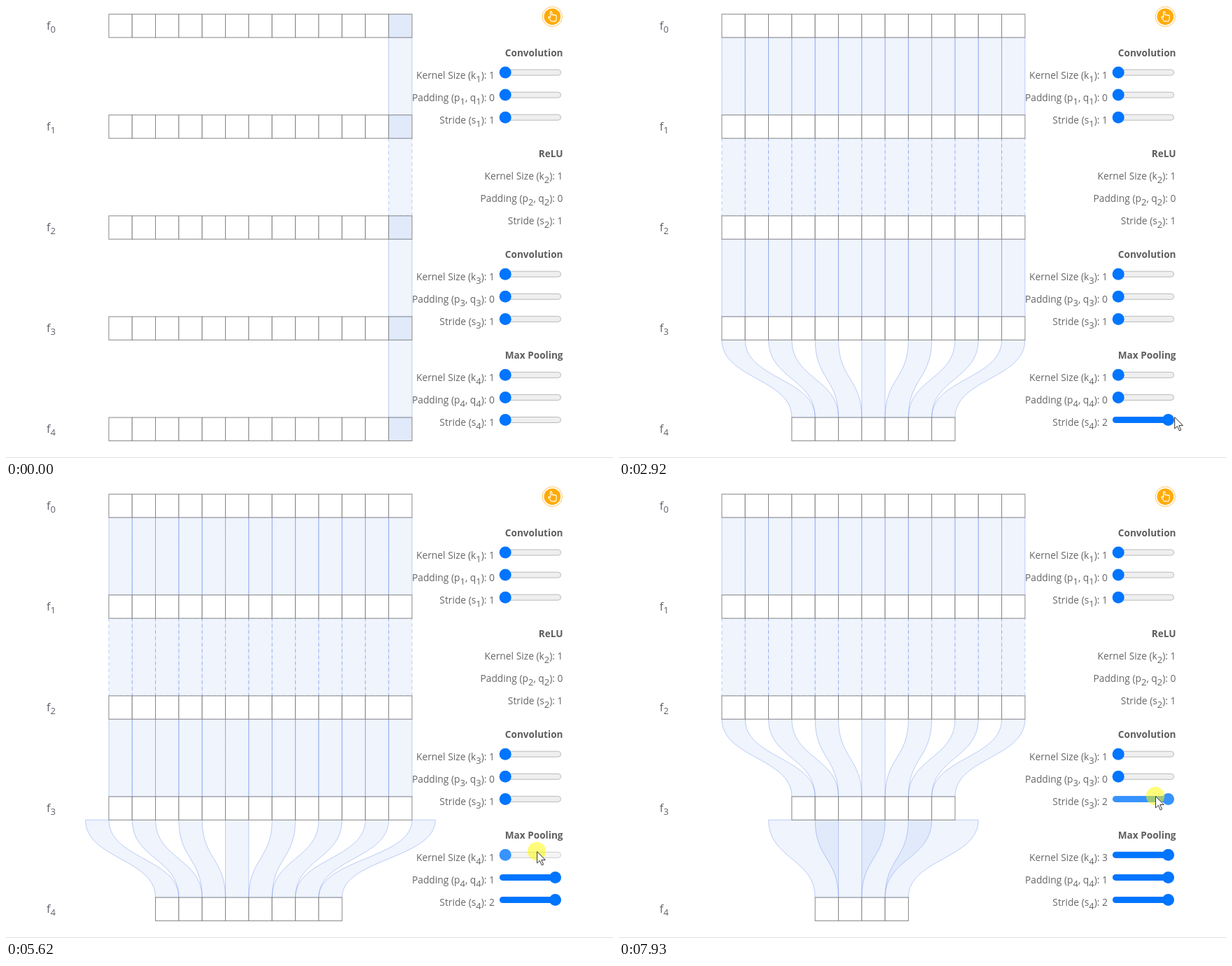
Recreate the animation shown at these times as an HTML page. Size 867 px wide and 646 px high, loop 8000 ms.

```html
<!DOCTYPE html>
<html lang="en">
<head>
<meta charset="utf-8">
<title>Receptive field explorer</title>
<style>
html, body { margin: 0; width: 867px; height: 646px; overflow: hidden; background: #fff; }
svg { display: block; }
text { font-family: "Open Sans", "Noto Sans", sans-serif; font-size: 13.8px; fill: #666; }
.title { font-weight: 700; font-size: 13.6px; fill: #5e5e5e; }
.end { text-anchor: end; }
.row { font-size: 16px; fill: #62626c; }
.cell { fill: #fff; stroke: #868686; }
.cell.lit { fill: #e0eafb; }
.band { fill: cornflowerblue; fill-opacity: .1; stroke: royalblue; stroke-opacity: .32; }
.dash { stroke-dasharray: 5 4; }
</style>
</head>
<body>
<svg id="stage" width="867" height="646" viewBox="0 0 867 646">
  <g id="bands"></g>
  <g id="cells"></g>
  <g id="labels"></g>
  <g id="sliders"></g>
  <g id="badge" transform="translate(780.3 15.2)">
    <circle r="14.2" fill="#fff" stroke="#ffc65c"/>
    <circle r="11.8" fill="#ffab09"/>
    <path d="M-2.8 1.5V-6.2q0-1.1 1.1-1.1t1.1 1.1V-2q.2-.9 1.2-.9t1.2 1q.2-.7 1.1-.7t1.1 1q.2-.5.9-.5 1 0 1 1.2V2.2Q5.900 4.500 4.600 6.700H-1.700Q-2.600 4.500-5.300 1.700-6 .6-5.200 0-4.200-.6-2.800 1.500Z"
      fill="none" stroke="#fff" stroke-width="1.1" stroke-linejoin="round"/>
  </g>
  <path d="M0 645.5H867" stroke="#dedede"/>
  <g id="pointer">
    <circle id="press" r="13.2" fill="#fffa00" fill-opacity=".52"/>
    <path d="M.5.5V17L4.300 13.400 7.200 20 9.600 18.900 6.700 12.500H12.200Z" fill="#fff" stroke="#333"/>
  </g>
</svg>
<script>
const NS = "http://www.w3.org/2000/svg";
const LOOP = 8000;
const LEFT = 146.9, TOP = 11.7, CELL = 33.31, GAP = 144.1, COLS = 13;
const $ = id => document.getElementById(id);

function add(parent, tag, attrs) {
  const node = document.createElementNS(NS, tag);
  for (const key in attrs) node.setAttribute(key, attrs[key]);
  parent.appendChild(node);
  return node;
}

// "_4" in a label becomes a subscript
function write(node, label, drop, size) {
  node.textContent = "";
  let shift = 0;
  label.split(/(_\d)/).forEach(part => {
    if (!part) return;
    const sub = part[0] === "_";
    const span = add(node, "tspan", { dy: sub ? drop : shift });
    if (sub) span.setAttribute("font-size", size);
    span.textContent = sub ? part[1] : part;
    shift = sub ? -drop : 0;
  });
}

const layers = [
  { name: "Convolution", sliders: true },
  { name: "ReLU", dashed: true },
  { name: "Convolution", sliders: true },
  { name: "Max Pooling", sliders: true }
];
const fields = [
  { key: "k", low: 1, high: 3, label: (n, v) => `Kernel Size (k_${n}): ${v}` },
  { key: "p", low: 0, high: 1, label: (n, v) => `Padding (p_${n}, q_${n}): ${v}` },
  { key: "s", low: 1, high: 2, label: (n, v) => `Stride (s_${n}): ${v}` }
];

// when each slider jumps to its high end, and when it is held
const drags = [
  { layer: 3, key: "s", from: 1460, set: 2010, to: 2630 },
  { layer: 3, key: "p", from: 3670, set: 4050, to: 4400 },
  { layer: 3, key: "k", from: 5340, set: 5680, to: 6150 },
  { layer: 2, key: "s", from: 7100, set: 7600, to: LOOP + 1 }
];

// time, x, y, eased
const track = [
  [250, 746, 656], [1000, 717, 591.5, 1], [1560, 717, 591.5], [1800, 728, 591],
  [2190, 773, 588], [2400, 788, 587], [2660, 796, 588], [2860, 796, 588],
  [3410, 714, 561, 1], [3730, 714, 561], [4400, 799, 551], [4620, 799, 551],
  [4940, 713, 527, 1], [5360, 713, 527], [5620, 758, 522], [6030, 801, 520],
  [6310, 801, 520], [6900, 713, 446, 1], [7130, 713, 446], [7700, 753, 443.500],
  [7860, 763, 443], [7930, 766, 443], [8000, 767, 443]
];

function pointerAt(t) {
  const i = track.findIndex(p => p[0] > t);
  if (i === 0) return null;
  if (i < 0) return track[track.length - 1].slice(1, 3);
  const a = track[i - 1], b = track[i];
  let u = (t - a[0]) / (b[0] - a[0]);
  if (b[3]) u = u * u * (3 - 2 * u);
  return [a[1] + (b[1] - a[1]) * u, a[2] + (b[2] - a[2]) * u];
}

for (let r = 0; r <= layers.length; r++) {
  write(add($("labels"), "text", { x: 58, y: 34 + GAP * r, class: "row" }), "f_" + r, 4, 13);
}

const controls = [];
layers.forEach((layer, i) => {
  const y = 72 + GAP * i;
  add($("labels"), "text", { x: 795.5, y, class: "title end" }).textContent = layer.name;
  fields.forEach((field, j) => {
    const c = { layer: i, field, cy: y + 23 + 32.1 * j };
    c.text = add($("labels"), "text", { x: layer.sliders ? 698 : 795.5, y: y + 32 * (j + 1), class: "end" });
    if (layer.sliders) {
      const bar = { x: 705.5, y: c.cy - 4, height: 8, rx: 4 };
      c.bar = add($("sliders"), "rect", { ...bar, width: 87 });
      c.fill = add($("sliders"), "rect", { ...bar, x: 705, y: c.cy - 4.5, height: 9, rx: 4.5, width: 80 });
      c.thumb = add($("sliders"), "circle", { cy: c.cy, r: 8.5 });
    }
    controls.push(c);
  });
});

function settings(t) {
  const all = layers.map(() => ({ k: 1, p: 0, s: 1 }));
  drags.forEach(d => {
    if (t >= d.set) all[d.layer][d.key] = fields.find(f => f.key === d.key).high;
  });
  return all;
}

function bandPath(x0, x1, u0, u1, y0, y1) {
  const m = (y0 + y1) / 2;
  return `M${x0} ${y0}C${x0} ${m} ${u0} ${m} ${u0} ${y1}H${u1}C${u1} ${m} ${x1} ${m} ${x1} ${y0}Z`;
}

function drawNet(all, onlyLast) {
  $("bands").textContent = $("cells").textContent = "";
  let count = COLS;
  const start = n => LEFT + Math.floor((COLS - n) / 2) * CELL;
  for (let r = 0; r <= layers.length; r++) {
    const y = TOP + GAP * r, x = start(count);
    for (let i = 0; i < count; i++) {
      const lit = onlyLast && i === count - 1;
      add($("cells"), "rect", { x: x + i * CELL, y, width: CELL, height: CELL, class: lit ? "cell lit" : "cell" });
    }
    if (r === layers.length) break;
    const { k, p, s } = all[r];
    const next = Math.floor((count + 2 * p - k) / s) + 1;
    for (let i = onlyLast ? next - 1 : 0; i < next; i++) {
      const from = x + (i * s - p) * CELL, to = start(next) + i * CELL;
      add($("bands"), "path", {
        d: bandPath(from, from + k * CELL, to, to + CELL, y + CELL, y + GAP),
        class: layers[r].dashed ? "band dash" : "band"
      });
    }
    count = next;
  }
}

const looks = {
  rest: ["#0075ff", "#efefef", "#bababa"],
  hover: ["#005cc8", "#e5e5e5", "#a7a7a7"],
  held: ["#3793ff", "#f5f5f5", "#cecece"]
};

function drawControls(all, held, at) {
  controls.forEach(c => {
    const { key, label, low } = c.field;
    const value = all[c.layer][key];
    const text = label(c.layer + 1, value);
    if (c.shown !== text) write(c.text, c.shown = text, 4.5, 13);
    if (!c.bar) return;
    const grabbed = held && held.layer === c.layer && held.key === key;
    const over = !held && at && at[0] > 704 && at[0] < 793 && Math.abs(at[1] - c.cy) < 8.5;
    const [blue, gray, edge] = looks[grabbed ? "held" : over ? "hover" : "rest"];
    const high = value > low;
    c.bar.setAttribute("fill", gray);
    c.bar.setAttribute("stroke", edge);
    c.fill.setAttribute("fill", blue);
    c.fill.setAttribute("visibility", high ? "visible" : "hidden");
    c.thumb.setAttribute("fill", blue);
    c.thumb.setAttribute("cx", high ? 784.5 : 713.2);
  });
}

let drawn = "";
function render(t) {
  const all = settings(t), at = pointerAt(t);
  const held = drags.find(d => t >= d.from && t < d.to);
  const onlyLast = t < drags[0].set;
  const state = JSON.stringify(all) + onlyLast;
  if (state !== drawn) drawNet(all, onlyLast);
  drawn = state;
  drawControls(all, held, at);
  $("pointer").setAttribute("visibility", at ? "visible" : "hidden");
  if (at) $("pointer").setAttribute("transform", `translate(${at})`);
  $("press").setAttribute("opacity", held ? 1 : 0);
}

const begin = performance.now();
function tick() {
  render((performance.now() - begin) % LOOP);
  requestAnimationFrame(tick);
}
tick();
</script>
</body>
</html>
```
